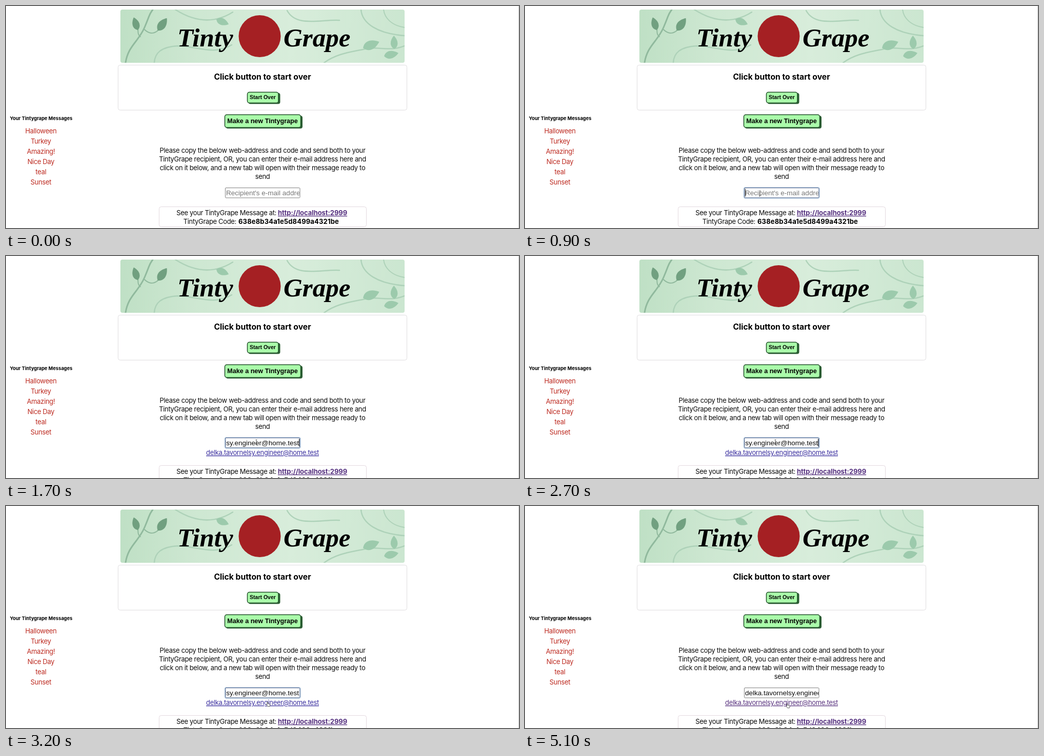
Recreate the animation shown at these times as an HTML page. Size 1000 px wide and 434 px high, loop 5200 ms.

```html
<!DOCTYPE html>
<html lang="en">
<head>
<meta charset="utf-8">
<title>TintyGrape</title>
<style>
  html, body { margin: 0; width: 100%; height: 100%; overflow: hidden; background: #fff; }
  svg { display: block; width: 1000px; height: 434px; }
  text { font: 13px Inter, "Open Sans", sans-serif; letter-spacing: -.026em; fill: #0c0c0c; }
  .mid { text-anchor: middle; }
  .end { text-anchor: end; }
  .side { fill: #bd2a20; }
  .label { font-size: 9.3px; font-weight: 700; letter-spacing: 0; fill: #000; }
  .head { font-size: 15.7px; font-weight: 700; letter-spacing: 0; fill: #000; }
  .btn { font: bold 10.5px "Liberation Sans", Arial, sans-serif; letter-spacing: 0; fill: #000; }
  .btn.big { font-size: 12.6px; }
  .field { font: 13.5px "Liberation Sans", Arial, sans-serif; letter-spacing: 0; }
  .hint { fill: #757575; }
  .mark { font: italic bold 51px "Liberation Serif", "Noto Serif", serif; letter-spacing: 0; fill: #000; }
  .link { font-weight: 700; letter-spacing: -.005em; fill: #55307f; text-decoration: underline; }
  .code { font-weight: 700; letter-spacing: .012em; fill: #000; }
  #mail { text-decoration: underline; }
  .card { fill: #fff; stroke: #dfdde0; }
  .face { fill: #aafcaa; stroke: #234f2b; stroke-width: 1.5; }
  .shade { fill: #2c5f34; }
  .vine { fill: none; stroke-linecap: round; }
</style>
</head>
<body>
<svg viewBox="0 0 1000 434">
  <defs>
    <linearGradient id="mint">
      <stop offset="0" stop-color="#bfe0c5"/>
      <stop offset=".25" stop-color="#cde7d1"/>
      <stop offset=".6" stop-color="#d8eddb"/>
      <stop offset="1" stop-color="#cbe6d0"/>
    </linearGradient>
    <clipPath id="banner"><rect x="223" y="7" width="554" height="104" rx="4"/></clipPath>
    <clipPath id="inner"><rect x="428.5" y="356" width="143.5" height="19"/></clipPath>
    <path id="leaf" d="M0 0C-10-6-8-17 0-26C8-17 10-6 0 0Z"/>
  </defs>

  <g clip-path="url(#banner)">
    <rect x="223" y="7" width="554" height="104" fill="url(#mint)"/>
    <g class="vine" stroke="#90b99d" stroke-width="3">
      <path d="M233 111C238 78 258 70 270 42S278 18 286 7"/>
      <path d="M270 46C280 56 290 54 297 47" stroke-width="2"/>
      <path d="M262 60C256 56 258 50 257 45" stroke-width="2"/>
    </g>
    <g class="vine" stroke="#aed2b9" stroke-width="2.5">
      <path d="M289 111C290 92 302 80 334 78C372 78 404 98 440 76"/>
      <path d="M330 7C366 30 404 36 442 12"/>
      <path d="M548 9C566 42 612 26 650 28"/>
      <path d="M620 111C646 92 674 90 700 84S748 90 777 78"/>
      <path d="M692 7C694 34 724 54 777 58"/>
      <path d="M736 7C738 24 752 38 777 42" stroke-width="2"/>
    </g>
    <g fill="#71a080">
      <use href="#leaf" transform="translate(257 47) rotate(-18)"/>
      <use href="#leaf" transform="translate(296 48) rotate(36) scale(1.15)"/>
    </g>
    <g fill="#9ccaac">
      <use href="#leaf" transform="translate(410 26) rotate(112)"/>
      <use href="#leaf" transform="translate(757 84) rotate(-2)"/>
      <use href="#leaf" transform="translate(696 82) rotate(69) scale(1.3)"/>
      <use href="#leaf" transform="translate(737 98) rotate(78) scale(1.1)"/>
    </g>
    <text class="mark" x="334" y="79">Tinty</text>
    <text class="mark" x="541" y="79">Grape</text>
    <circle cx="494.5" cy="59" r="41" fill="#a52023"/>
  </g>

  <rect x="999" width="1" height="434" fill="#c8c8c8"/>

  <rect class="card" x="218.5" y="115.5" width="563" height="88" rx="4"/>
  <text class="head mid" x="500" y="144">Click button to start over</text>

  <rect class="shade" x="472.5" y="170" width="62" height="21.5" rx="4"/>
  <rect class="face" x="470.5" y="168.5" width="60.5" height="21" rx="4"/>
  <text class="btn mid" x="500.5" y="182">Start Over</text>

  <rect class="shade" x="428.5" y="214.5" width="149.5" height="25" rx="4"/>
  <rect class="face" x="426.5" y="212.5" width="148" height="25" rx="4"/>
  <text class="btn big mid" x="500" y="229.3">Make a new Tintygrape</text>

  <text class="label mid" x="68.5" y="223">Your Tintygrape Messages</text>
  <g class="mid">
    <text class="side" x="68" y="248.5">Halloween</text>
    <text class="side" x="68" y="268.5">Turkey</text>
    <text class="side" x="68" y="288.5">Amazing!</text>
    <text class="side" x="68" y="308.5">Nice Day</text>
    <text class="side" x="68" y="328.5">teal</text>
    <text class="side" x="68" y="348.5">Sunset</text>

    <text x="500" y="287">Please copy the below web-address and code and send both to your</text>
    <text x="500" y="304">TintyGrape recipient, OR, you can enter their e-mail address here and</text>
    <text x="500" y="321">click on it below, and a new tab will open with their message ready to</text>
    <text x="500" y="338">send</text>
  </g>

  <rect id="glow" x="426.5" y="354.5" width="147.5" height="21.5" rx="3" fill="none" stroke="#d9e9f5" stroke-width="2"/>
  <rect id="box" x="427.5" y="355.5" width="145.5" height="19.5" rx="1.5" fill="#fff"/>
  <g clip-path="url(#inner)">
    <text id="hint" class="field hint" x="429" y="370">Recipient's e-mail address</text>
    <text id="value" class="field" y="370"></text>
  </g>
  <rect id="caret" y="357.5" width="1" height="15" fill="#111"/>
  <text id="mail" class="mid" x="500" y="389"></text>

  <g id="share">
    <rect class="card" x="298.5" y="392.5" width="404" height="39" rx="4" style="stroke:#e3d9df"/>
    <text class="end" x="527" y="409">See your TintyGrape Message at:</text>
    <text class="link" x="530" y="409">http://localhost:2999</text>
    <text class="end" x="449" y="426">TintyGrape Code:</text>
    <text class="code" x="453" y="426">638e8b34a1e5d8499a4321be</text>
  </g>

  <path id="beam" d="M-1.5-5Q0-5 0-4Q0-5 1.5-5M0-4V4M-1.5 5Q0 5 0 4Q0 5 1.5 5" fill="none" stroke="#444" stroke-width=".9"/>
  <path id="hand" d="M-2-4.5q1-1 1.7 0v3l3.4 .8q1 .5 .7 1.7l-.8 2.8h-3.8l-2.4-3q0-1.2 1.2-.6z" fill="#fff" stroke="#333" stroke-width=".8"/>
</svg>
<script>
const LOOP = 5200;
const EMAIL = "delka.tavornelsy.engineer@home.test";
const el = id => document.getElementById(id);
const show = (node, on) => node.style.display = on ? "" : "none";

// time, x, y, pointer shape
const POINTER = [
  [0, 0, 0, ""],
  [200, 478, 430, "beam"], [300, 474, 416, "beam"], [400, 469, 401, "beam"],
  [500, 464, 386, "beam"], [600, 460, 373, "beam"], [700, 458, 366, "beam"],
  [1100, 474, 365, "beam"], [1200, 488, 364, "beam"],
  [2800, 491, 367, "beam"], [2900, 497, 373, "beam"],
  [3000, 504, 380, "hand"], [3100, 509, 385, "hand"], [3200, 511, 388, "hand"],
  [3300, 511.5, 389.5, "hand"], [3600, 512.5, 391, "hand"]
];
const CARET = [[900, 1400], [1700, 2200], [2700, 3200]];

el("mail").textContent = el("value").textContent = EMAIL;

function draw(t) {
  const focus = t >= 800 && t < 3800;
  const filled = t >= 1700;

  show(el("glow"), focus);
  el("glow").style.opacity = t < 900 ? .5 : 1;
  el("box").setAttribute("stroke", focus ? (t < 900 ? "#56677f" : "#2f4878") : "#808080");

  show(el("hint"), !filled);
  show(el("value"), filled);
  el("value").setAttribute("x", focus ? 571 : 429);
  el("value").style.textAnchor = focus ? "end" : "start";

  show(el("caret"), CARET.some(([a, b]) => t >= a && t < b));
  el("caret").setAttribute("x", filled ? 571 : 429);

  show(el("mail"), filled);
  el("mail").style.fill = t >= 5100 ? "#5b3580" : "#3d32a0";
  el("share").setAttribute("transform", `translate(0 ${filled ? 17 : 0})`);

  const [, x, y, shape] = POINTER.findLast(step => step[0] <= t);
  for (const id of ["beam", "hand"]) {
    show(el(id), id === shape);
    el(id).setAttribute("transform", `translate(${x} ${y})`);
  }
}

const start = performance.now();
function tick() {
  draw((performance.now() - start) % LOOP);
  requestAnimationFrame(tick);
}
tick();
</script>
</body>
</html>
```
